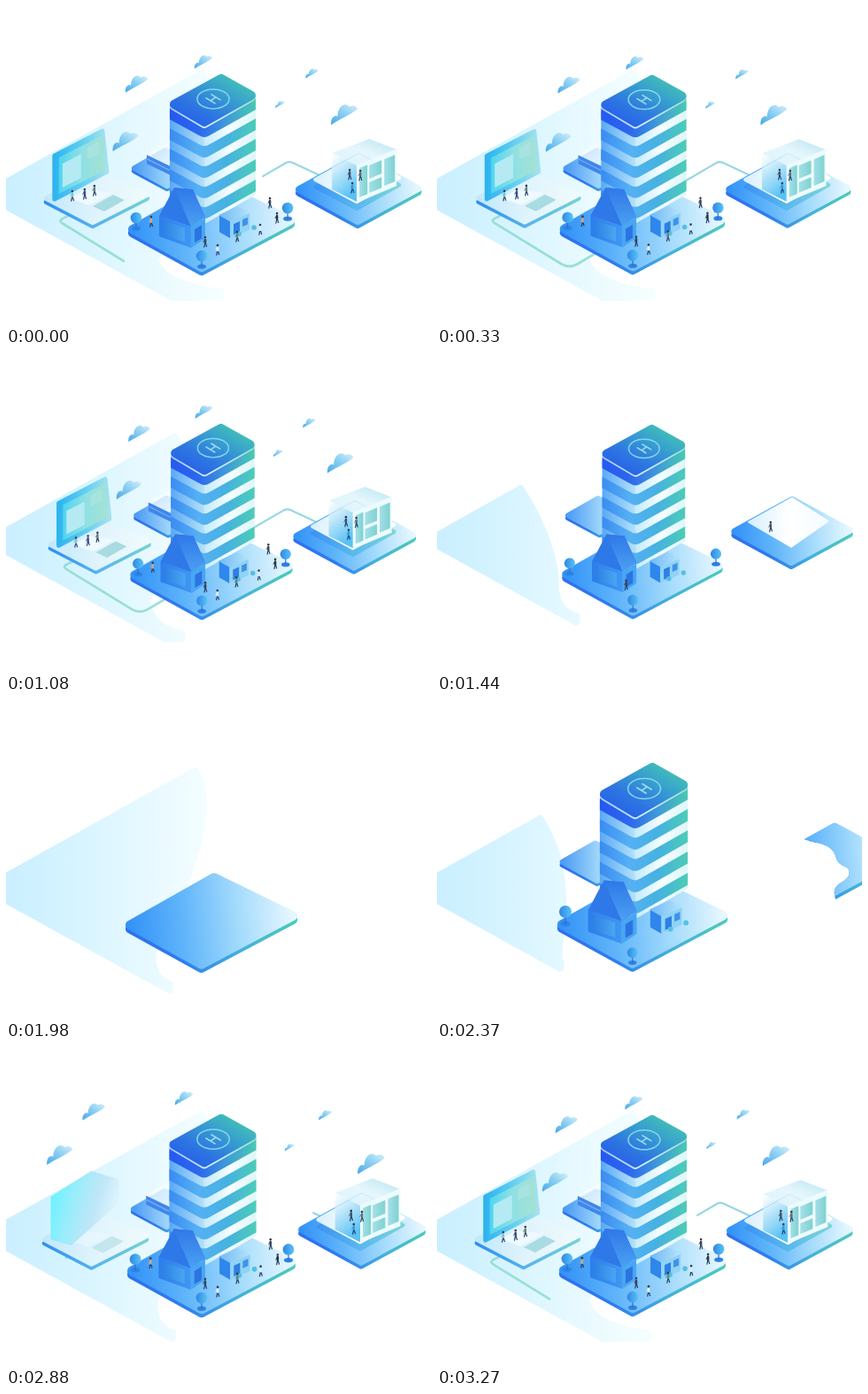
An HTML page for the animation above (3300 ms loop, 480 by 360 pixels).

```html
<!DOCTYPE html>
<html lang="en">
<head>
<meta charset="utf-8">
<title>Isometric campus</title>
<style>
html, body { margin: 0; width: 100%; height: 100%; overflow: hidden; background: #fff; }
svg { display: block; width: 100vw; height: 100vh; }
</style>
</head>
<body>
<svg id="stage" viewBox="0 0 480 360"><defs id="defs"></defs></svg>
<script>
const LOOP = 3300;
const LEAD = 1590; // age of the scene when the page opens
const stage = document.getElementById('stage');
const defs = document.getElementById('defs');

// --- Drawing helpers ---
function el(parent, tag, attrs = {}) {
  const node = document.createElementNS('http://www.w3.org/2000/svg', tag);
  for (const k in attrs) node.setAttribute(k, attrs[k]);
  parent.appendChild(node);
  return node;
}
const group = parent => el(parent, 'g');

let gradCount = 0;
// A stop is "colour" or "colour opacity"
function grad([x1, y1, x2, y2], stops, units = 'objectBoundingBox') {
  const id = 'g' + gradCount++;
  const g = el(defs, 'linearGradient', { id, x1, y1, x2, y2, gradientUnits: units });
  stops.forEach((s, i) => {
    const [color, alpha = 1] = s.split(' ');
    el(g, 'stop', { offset: i / (stops.length - 1), 'stop-color': color, 'stop-opacity': alpha });
  });
  return `url(#${id})`;
}
const across = (...stops) => grad([0, 0, 1, 0], stops);
const down = (...stops) => grad([0, 0, 0, 1], stops);
const rising = (...stops) => grad([0, 1, 1, 0], stops);

function poly(parent, points, fill, round = 0) {
  const a = { points, fill };
  if (round) Object.assign(a, { stroke: fill, 'stroke-width': round, 'stroke-linejoin': 'round' });
  return el(parent, 'polygon', a);
}
// Upright panel seen in perspective: x, y of its top left, size, and slope of its top edge
function panel(parent, x, y, w, h, slope, fill) {
  const y2 = y + w * slope;
  return poly(parent, `${x},${y} ${x + w},${y2} ${x + w},${y2 + h} ${x},${y + h}`, fill);
}
function line(parent, d, stroke, width, extra = {}) {
  return el(parent, 'path', {
    d, stroke, fill: 'none', 'stroke-width': width,
    'stroke-linecap': 'round', 'stroke-linejoin': 'round', ...extra
  });
}
function dot(parent, cx, cy, r, fill) { return el(parent, 'circle', { cx, cy, r, fill }); }

// Flat plate with a coloured rim below it
function plate(parent, points, top, rim, depth, round) {
  const g = group(parent);
  poly(g, points, rim, round).setAttribute('transform', `translate(0 ${depth})`);
  poly(g, points, top, round);
  return g;
}

const BACK = -.57, FRONT = .57;
const rim = across('#2f70ef', '#2f7df0', '#42b0dc', '#4cc9bd');
const deckTop = grad([0, .5, 1, .45], ['#3493f7', '#62b6fa', '#a4dbfc', '#e6f7fe']);

// --- Ground and clouds ---
const sea = grad([0, 0, 250, 0], ['#caefff', '#d3f3ff', '#e0f7ff', '#edfbff', '#f7ffff'], 'userSpaceOnUse');
const ground = el(stage, 'path', { fill: sea, stroke: sea, 'stroke-width': 5, 'stroke-linejoin': 'round' });
const scene = group(stage);

// x, y, size, and the offset each cloud glides in from
const cloudFill = rising('#48a8ea', '#86cdf3', '#d5f0fb');
const clouds = [
  [148, 88, 1, -48, -14], [223, 63, .8, -22, -4], [136, 153, 1.15, -74, -31],
  [345, 76, .58, 14, 2], [309, 111, .42, 10, 3], [381, 122, 1.2, 29, 10]
].map(([x, y, s, dx, dy]) => {
  const g = group(scene);
  el(g, 'path', {
    d: 'M-12,10 C-13,4 -9,0 -6,2 C-6,-7 1,-12 5,-7 C8,-9 12,-8 13,-5 C6,1 -3,4 -12,10Z',
    fill: cloudFill
  });
  return { g, x, y, s, dx, dy };
});

// --- Connecting lines ---
const wireL = line(scene, 'M74,235 L64,240 Q59,243 65,246 L140,292 Q149,297 158,292 L185,276', '#9adfd4', 2.8, { pathLength: 100 });
const wireR = line(scene, 'M354,191 L324,177 Q320,175 316,177 L280,198', '#98d7e2', 2.2, { pathLength: 100 });

// --- Plate behind the tower ---
const back = group(scene);
plate(back, '145,183 180,163 218,184 182,203', across('#4d9cf4', '#9bd3fa', '#e3f5fd'), rim, 3, 6);
const box = group(back);
poly(box, '159,167 185,153 200,160 200,190 186,188 159,175', down('#ffffff .5', '#e4f5fd'));
panel(box, 159, 168, 27, 10, .48, '#3f86ec');
line(box, 'M160,173 L186,186', '#80baf5', 1);

// --- Laptop ---
const laptop = group(scene);
plate(laptop, '46,217 98,188 159,213 98,244', across('#c3e8fb', '#e0f4fc', '#f0fafc'), across('#2f8ff0', '#58b4f0', '#74d3d0'), 4, 6);
const keyboard = group(laptop);
poly(keyboard, '98,226 121,213 134,219 111,232', '#a9dbe2');
poly(keyboard, '72,217 90,207 120,211 94,225', '#eefaff');
const flap = poly(laptop, '54,170 98,142 127,151 128,175 75,222 54,216',
  grad([0, .3, 1, .6], ['#6cf2ff', '#9cecfb', '#bfe6f8 .95', '#e4f6fd .8']), 3);
const screen = group(laptop);
poly(screen, '55,169 109,141 114,187 55,218', across('#2fb4f0', '#5fcdf0', '#a5e2ee'), 5);
poly(screen, '60,171 109,146 112,185 60,212', across('#4fd5f0', '#8fe0e4', '#a5e2d2'));
panel(screen, 64, 178, 21, 27, -.52, '#b5eaf2');
panel(screen, 92, 160, 13, 13, -.52, '#a9e3df');

// --- Pavilion on the right ---
const clip = el(defs, 'clipPath', { id: 'tide', clipPathUnits: 'userSpaceOnUse' });
const tide = el(clip, 'path', {
  d: 'M700,0 L400,0 L400,150 C412,166 438,156 446,176 C450,192 462,184 461,196 C458,208 440,204 446,224 L446,360 L700,360Z'
});
const lot = group(el(scene, 'g', { 'clip-path': 'url(#tide)' }));
plate(lot, '331,207 398,170 465,206 397,243', deckTop, rim, 4, 8);
const slab = plate(lot, '349,196 398,169 444,194 396,221', across('#d9f0fd', '#ffffff', '#ffffff'),
  across('#3c93f2', '#59b8ee', '#7fd5d6'), 8, 4);
const mat = poly(lot, '347,196 398,168 440,195 397,225', across('#d6effd', '#ffffff', '#f3fbff'), 2);
const pavilion = group(lot);
poly(pavilion, '368,166 410,150 441,162 396,180', rising('#d3f0fb .8', '#dff4fb .8', '#b2e3ef'));
panel(pavilion, 368, 166, 28, 41, .5, grad([0, 0, .4, 1], ['#ffffff .5', '#a9dff8 .9', '#58c1f4']));
panel(pavilion, 396, 180, 45, 42, -.42, '#eefbfd');
const pane = across('#a4dfe8', '#7fd2d0');
for (const [x, y, w, h] of [[399, 183, 9, 33], [410, 180, 14, 15], [410, 199, 14, 12], [427, 173, 12, 30]]) {
  panel(pavilion, x, y, w, h, -.42, pane);
}

// --- Main platform ---
const deck = plate(scene, '143,252 235,200 321,242 221,295', deckTop, rim, 4, 10);

// --- Tower: rounded floors stacked at an even pitch ---
const tower = group(scene);
panel(tower, 185, 118, 39, 107, .58, across('#58a8f5', '#b5e1fb'));
panel(tower, 224, 141, 58, 105, BACK, across('#c6ebfb', '#f5fdff', '#dff6f7'));
const topFloor = across('#2558f0', '#2d67ee', '#3f9bd8', '#48c9b2');
const midFloor = across('#3a8bf1', '#55b0f4', '#46b2e0', '#4cccb7');
const PITCH = 23;
for (let k = 0; k < 5; k++) {
  const y = 137 + PITCH * k, h = 13;
  const corner = b => `L218,${b - 4} Q224,${b} 230,${b - 4}`;
  el(tower, 'path', {
    d: `M185,${y - 22} ${corner(y)} L282,${y - 33} V${y - 33 + h} L230,${y + h - 4} Q224,${y + h} 218,${y + h - 4} L185,${y - 22 + h}Z`,
    fill: k ? midFloor : topFloor
  });
}
plate(tower, '190,111 243,82 277,101 224,131', rising('#245bea', '#2e76e2', '#38a2cd', '#46caaf'),
  across('#a8cffb', '#d6effc', '#9fe0da'), 2, 10);
el(tower, 'ellipse', { cx: 234, cy: 105, rx: 18, ry: 11, fill: 'none', stroke: '#86d5ec', 'stroke-width': 1.5 });
line(tower, 'M226,104 L236,110 M232,100 L242,106 M231,107 L237,103', '#9bdcef', 1.6);

// --- Barn and kiosk ---
const barn = group(scene);
poly(barn, '173,237 190,205 211,207 225,238 209,249', '#2f78e8');
poly(barn, '190,205 211,207 225,238 209,249', down('#2f78e8', '#4ba0f2'));
panel(barn, 173, 236, 36, 24, .36, across('#2d7dec', '#3f97f2'));
panel(barn, 177, 242, 25, 16, .33, across('#2b80e4', '#4aa6f2'));
panel(barn, 209, 249, 16, 24, -.66, '#48a6f2');
panel(barn, 213, 252, 8, 15, -.6, '#2b74e2');

const kiosk = group(scene);
panel(kiosk, 241, 236, 12, 19, FRONT, '#2f86ec');
panel(kiosk, 253, 243, 22, 19, -.44, '#8fd3f5');
poly(kiosk, '240,236 261,226 277,233 253,243', across('#6fb9f7', '#b9e4fa'));
panel(kiosk, 257, 246, 7, 12, -.44, '#2f7fe4');
panel(kiosk, 267, 241, 6, 8, -.44, '#3f92e8');

// --- Trees and bushes ---
const leaf = across('#2f86e6', '#58c4f2');
const trees = [[147, 251], [221, 294], [318, 240]].map(([x, y]) => {
  const g = group(scene);
  el(g, 'ellipse', { cx: x, cy: y, rx: 5, ry: 2.6, fill: '#2f83e4' });
  line(g, `M${x},${y} V${y - 9}`, '#2b6fd0', 1.2);
  dot(g, x, y - 12, 6.3, leaf);
  return { g, x, y };
});
const bushes = [[263, 257], [280, 250]].map(([x, y]) => dot(scene, x, y, 2.8, '#55bfe0'));

// --- People: foot point and shirt colour ---
function person(x, y, shirt) {
  const g = group(scene);
  const p = el(g, 'g', { transform: `translate(${x} ${y})` });
  line(p, 'M-.2,-5 L-1.2,0 M.3,-5 L1.6,-.6', '#27406b', 1.2);
  line(p, 'M0,-8.4 V-5.4', shirt, 2.5);
  line(p, 'M-.8,-8 L-2.2,-5.6', shirt, .8);
  dot(p, 0, -11, 1.3, '#33384f');
  return { g, x, y };
}
const people = list => list.map(a => person(...a));
const crowd = people([
  [164, 249, '#c9a98a'], [239, 281, '#e6eef2'], [261, 266, '#5a8a86'],
  [287, 258, '#d9eef5'], [298, 228, '#35455f'], [306, 245, '#26334f']
]);
const staff = people([[75, 220, '#7fc4cf'], [89, 218, '#3b4a9a'], [100, 214, '#6b7f78']]);
const guests = people([[400, 197, '#5c6f86'], [391, 211, '#2f9de8']]);
const walker = person(225, 272, '#3d4052');
const host = person(388, 196, '#41566b');

// --- Timing ---
const ramp = (age, start, span) => Math.min(1, Math.max(0, (age - start) / span));
const smooth = u => u * u * (3 - 2 * u);
const settle = (u, s) => 1 + (s + 1) * (u - 1) ** 3 + s * (u - 1) ** 2;

// Springs in at `start`, eases out at `end`
function life(age, start, end, span = 240, s = .9, outSpan = 170) {
  return settle(ramp(age, start, span), s) * (1 - smooth(ramp(age, end, outSpan)));
}
// Straight fade in and out
const shown = (age, start, end, span = 220) => ramp(age, start, span) - ramp(age, end, span);

function grow(g, x, y, sx, sy = sx, dx = 0, dy = 0) {
  g.style.display = sy > .01 ? '' : 'none';
  g.setAttribute('transform', `translate(${x + dx} ${y + dy}) scale(${sx} ${sy}) translate(${-x} ${-y})`);
}
const fade = (g, a) => g.setAttribute('opacity', a);
function drawWire(path, pct) {
  path.style.display = pct > .5 ? '' : 'none';
  path.setAttribute('stroke-dasharray', `${pct} 300`);
}

// Wedge of ground whose right shore ebbs once, spreads, and ebbs again
function shoreline(age) {
  const dip = Math.exp(-(((age - 660) / 240) ** 2));
  const ebb = smooth(ramp(age, 2500, 530));
  const tail = ramp(age, 1170, 420) - ramp(age, 2400, 400);
  const tx = 222 - 105 * dip - 127 * ebb, ty = 197 - .555 * tx + 7 * ebb;
  const bx = 188 - 49 * dip - 31 * ebb, by = 230 + .535 * bx - 9 * ebb;
  const mx = 110 + .27 * tx, my = 230 + .25 * tx;
  return `M-8,${202 + 7 * ebb} L${tx},${ty} Q${tx + 34},${ty + 52} ${mx},${my} ` +
    `Q${mx - 4 + 12 * tail},${by - 16} ${bx + 2 + 54 * tail},${by - 9} L${bx + 2 + 54 * tail},${by - 1} ` +
    `L${bx},${by} L-8,${223 - 9 * ebb}Z`;
}

function render(age) {
  ground.setAttribute('d', shoreline(age));
  const slide = ramp(age, 3100, 200) + 1 - smooth(ramp(age, 0, 220));
  ground.setAttribute('transform', `translate(${-260 * slide} 0)`);
  grow(scene, 231, 190, 1.04 - .0245 * age / 1000);

  const glide = 3.1 * (1 - ramp(age, 800, 857)) ** 2 + .6 * ramp(age, 2760, 230);
  const haze = shown(age, 810, 2760);
  for (const c of clouds) {
    c.g.setAttribute('transform', `translate(${c.x + c.dx * glide} ${c.y + c.dy * glide}) scale(${c.s})`);
    fade(c.g, haze);
  }

  const unwire = 1 - ramp(age, 2740, 200);
  drawWire(wireL, 100 * ramp(age, 1150, 700) * unwire);
  drawWire(wireR, 100 * ramp(age, 1110, 560) * unwire);

  grow(deck, 231, 249, life(age, 20, 3190, 220, .5, 110));
  grow(back, 182, 185, life(age, 490, 3070));
  grow(box, 182, 188, 1, life(age, 840, 2840));

  grow(laptop, 98, 218, life(age, 810, 2780));
  grow(screen, 60, 217, 1, life(age, 1190, 2690, 190, .4));
  fade(flap, shown(age, 900, 1200, 180));
  fade(keyboard, shown(age, 1050, 2690));

  const push = 70 * ((1 - ramp(age, 510, 800)) ** 2 + ramp(age, 2930, 280) ** 2);
  lot.setAttribute('transform', `translate(${push} ${BACK * push})`);
  tide.setAttribute('transform', `translate(${100 - 240 * (ramp(age, 480, 430) - ramp(age, 3040, 160))} 0)`);
  grow(slab, 397, 226, 1, life(age, 850, 2870));
  grow(pavilion, 396, 222, 1, life(age, 890, 2830));
  fade(mat, ramp(age, 2840, 150));

  const rise = life(age, 500, 3060, 250, .8, 190);
  grow(tower, 232, 248, Math.min(1, rise * 1.5), rise);
  grow(barn, 205, 268, life(age, 490, 3060));
  grow(kiosk, 256, 257, life(age, 510, 3060));

  trees.forEach((p, i) => grow(p.g, p.x, p.y, life(age, 490 + 90 * i, 3050 + 20 * i, 260, 1.7)));
  bushes.forEach(b => b.setAttribute('r', 2.8 * shown(age, 530, 3050, 120)));

  const cast = (list, start, end) => list.forEach((p, i) =>
    grow(p.g, p.x, p.y, life(age, start + 35 * i, end + 25 * i, 150, 1.2, 90)));
  cast(crowd, 840, 2770);
  cast(staff, 1270, 2670);
  cast(guests, 940, 2790);

  const stray = ramp(age, 2750, 280);
  grow(walker.g, walker.x, walker.y, life(age, 850, 3040), undefined, -12 * stray, -2 * stray);
  grow(host.g, host.x, host.y, life(age, 940, 3040), undefined, -6 * stray, 6 * stray);
}

const begin = performance.now();
function tick() {
  render((performance.now() - begin + LEAD) % LOOP);
  requestAnimationFrame(tick);
}
tick();
</script>
</body>
</html>
```
